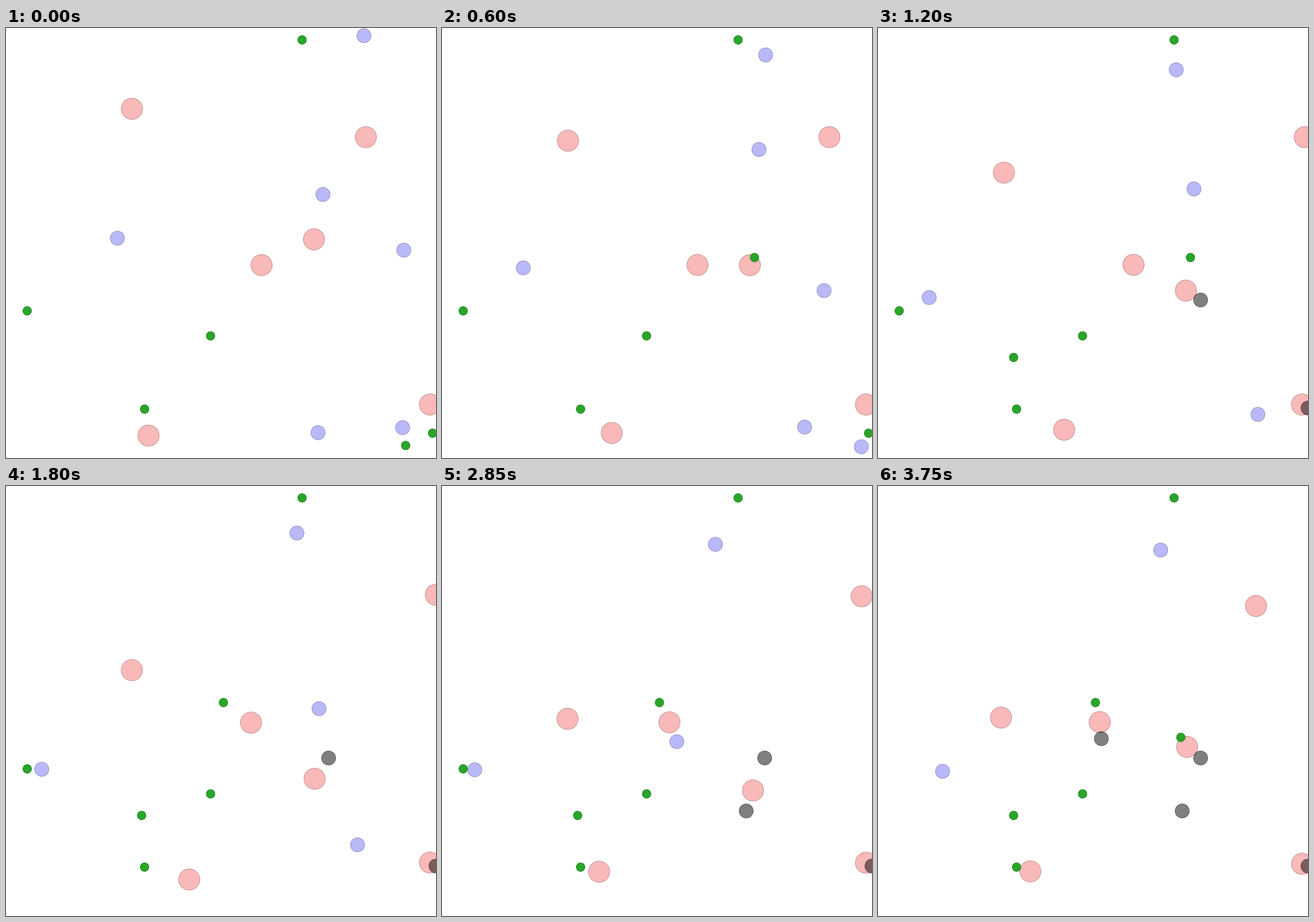
Recreate the animation shown at these times as a matplotlib script. Size 700 px wide and 700 px high, loop 3.9 s.

```python
import numpy as np
import matplotlib.pyplot as plt
from matplotlib.animation import FuncAnimation
from matplotlib.patches import Circle

SIZE, DPI = 700, 100
FRAMES, INTERVAL = 26, 150

RED, BLUE, GREEN = "#f9b9b9", "#b9b9f9", "#28a628"
DEAD = (0, 0, 0, 0.5)
R_HUNTER, R_PREY, R_FOOD = 17.3, 11.5, 7.0

# Turning points of each path: (step, x, y)
HUNTERS = [
    [(0, 205, 131.5), (8, 205, 235.5), (19, 204.4, 379), (25, 200.3, 377)],
    [(0, 585.8, 177.7), (4, 630.6, 177.7), (9, 700, 177.7), (16, 699, 176),
     (25, 615.3, 195.3)],
    [(0, 501.3, 344), (8, 501.2, 427.5), (16, 504.6, 505.5), (19, 506.2, 495.6),
     (25, 503.2, 424.8)],
    [(0, 416, 386), (8, 416, 385.5), (16, 376.6, 385), (25, 361, 384.4)],
    [(0, 232, 663.5), (8, 303, 654), (16, 286.7, 629.2), (19, 255.8, 628),
     (25, 248, 627.3)],
    [(0, 690.2, 613), (16, 690.2, 613), (25, 690.2, 615)],
]
PREY = [
    [(0, 582.7, 12.5), (8, 485.5, 68), (12, 473.6, 76.6), (16, 441.7, 89.3),
     (25, 460.2, 104.3)],
    [(0, 516, 271), (4, 516, 197.8), (12, 509.6, 362.5), (16, 438, 427.5),
     (20, 363.6, 411.4)],
    [(0, 181.3, 342.2), (12, 58.2, 461.2), (19, 53.3, 462), (21, 47, 462),
     (25, 105.2, 464.4)],
    [(0, 647.6, 361.6), (4, 622, 427.5), (8, 525.2, 442.8)],
    [(0, 507.9, 658.7), (4, 590.3, 649.7), (8, 618.4, 629), (16, 495.2, 529)],
    [(0, 645.7, 650.5), (4, 682.7, 681.7), (7, 700, 618.7)],
]
FOOD = [(482, 19.4), (34.5, 460.5), (333, 501.2), (225.6, 620.4),
        (650.6, 679.6), (694.4, 659.6)]
REGROWTH = [(508.7, 373.7), (220.8, 536.3), (354, 352.5), (493, 409.2)]


def follow(points, step):
    """Cubic path that slows to a stop on each axis where it turns back."""
    points = np.array(points, float)
    times, spots = points[:, 0], points[:, 1:]
    gaps = np.diff(times)[:, None]
    chords = np.diff(spots, axis=0) / gaps
    before, after = chords[:-1], chords[1:]
    same_way = before * after > 0
    total = np.where(same_way, before + after, 1)
    inner = np.where(same_way, 2 * before * after / total, 0)
    slopes = np.vstack([chords[:1], inner, chords[-1:]])

    t = min(step, times[-1])
    i = min(np.searchsorted(times, t, side="right") - 1, len(gaps) - 1)
    u = (t - times[i]) / gaps[i]
    ease = u * u * (3 - 2 * u)
    return (spots[i] + ease * (spots[i + 1] - spots[i])
            + u * (1 - u) * gaps[i] * ((1 - u) * slopes[i] - u * slopes[i + 1]))


def touching(a, b, reach):
    return np.hypot(a[0] - b[0], a[1] - b[1]) < reach


def simulate():
    """Hunters kill prey they touch; eaten food regrows elsewhere."""
    caught = [None] * len(PREY)
    food, regrowth = list(FOOD), iter(REGROWTH)
    states = []
    for step in range(FRAMES):
        hunters = [follow(path, step) for path in HUNTERS]
        for i, path in enumerate(PREY):
            if caught[i] is not None:
                continue
            spot = follow(path, step)
            if any(touching(spot, h, R_HUNTER + R_PREY) for h in hunters):
                caught[i] = spot
            food = [next(regrowth, f) if touching(spot, f, R_PREY + R_FOOD) else f
                    for f in food]
        prey = [follow(path, step) if c is None else c
                for path, c in zip(PREY, caught)]
        states.append((hunters, prey, [c is not None for c in caught], food))
    return states


STATES = simulate()

fig = plt.figure(figsize=(SIZE / DPI, SIZE / DPI), dpi=DPI, facecolor="white")
ax = fig.add_axes([0, 0, 1, 1])
ax.set_xlim(0, SIZE)
ax.set_ylim(SIZE, 0)
ax.axis("off")


def discs(count, radius, fill, layer):
    return [ax.add_patch(Circle((0, 0), radius, facecolor=fill, edgecolor=rim(fill),
                                linewidth=0.6, zorder=layer))
            for _ in range(count)]


def rim(fill):
    return tuple(0.75 * c for c in plt.matplotlib.colors.to_rgb(fill))


hunter_discs = discs(len(HUNTERS), R_HUNTER, RED, 1)
prey_discs = discs(len(PREY), R_PREY, BLUE, 2)
food_discs = discs(len(FOOD), R_FOOD, GREEN, 3)


def update(step):
    hunters, prey, dead, food = STATES[step]
    patches = hunter_discs + prey_discs + food_discs
    for patch, spot in zip(patches, [*hunters, *prey, *food]):
        patch.center = tuple(spot)
    for patch, is_dead in zip(prey_discs, dead):
        patch.set_facecolor(DEAD if is_dead else BLUE)
        patch.set_edgecolor(DEAD if is_dead else rim(BLUE))
    return patches


anim = FuncAnimation(fig, update, frames=FRAMES, interval=INTERVAL,
                     repeat=True, repeat_delay=0, blit=False)
plt.show()
```
